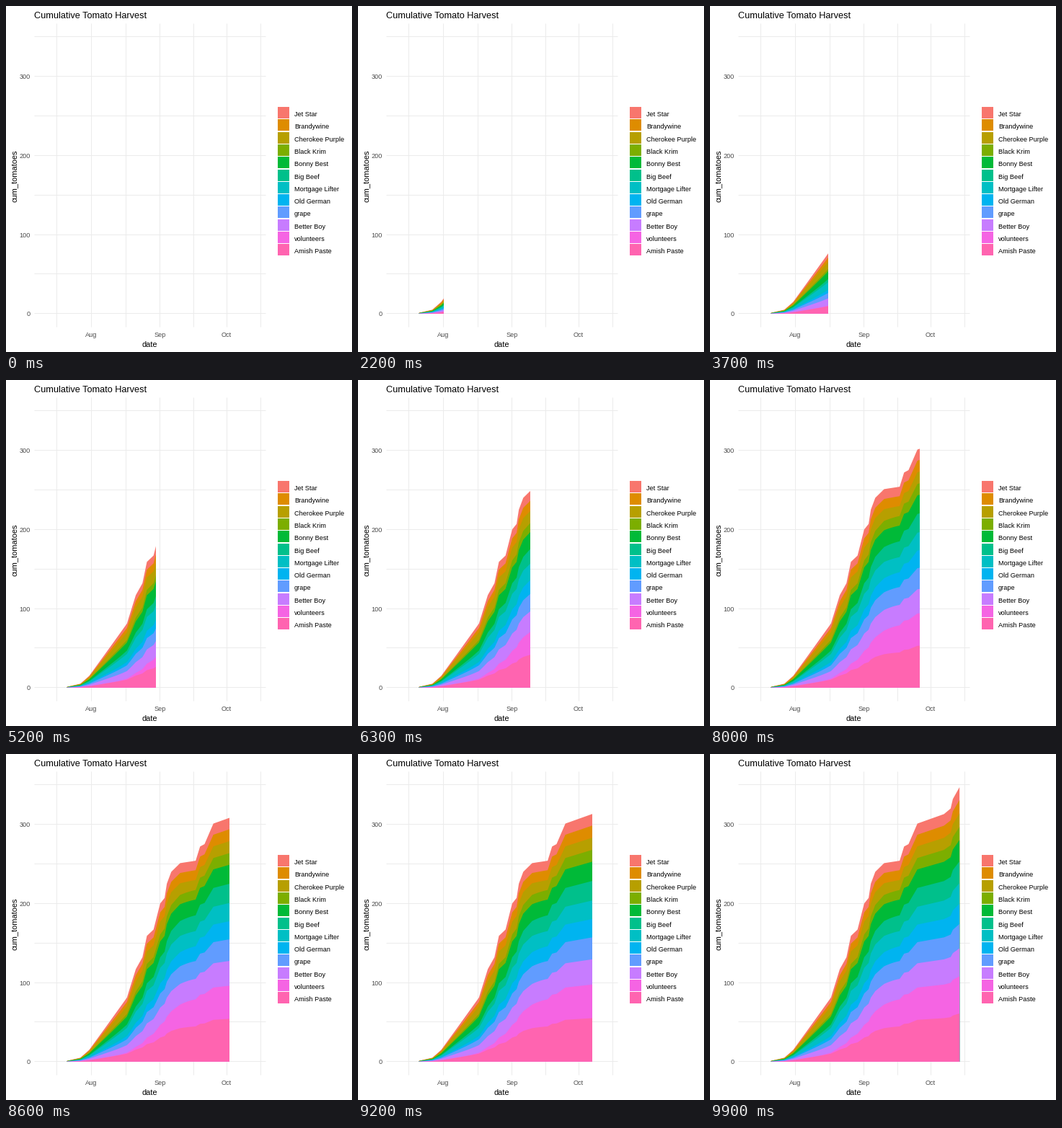
Recreate the animation shown at these times as a matplotlib script. Size 480 by 480 pixels, loop 10000 ms.

```python
import numpy as np
import matplotlib.pyplot as plt
from matplotlib.animation import FuncAnimation
from matplotlib.patches import Rectangle
from matplotlib.transforms import Bbox, TransformedBbox

SIZE, DPI = 480, 100
FRAMES, INTERVAL = 100, 100
FIRST_PICK, LAST_DAY = 10, 95  # days are counted from 11 July
LEFT, RIGHT, TOP, BOTTOM = 39, 360, 24, 445
BASELINE = 426
MONTHS = {"Aug": 21, "Sep": 52, "Oct": 82}

# Name, colour, percentage of the harvest early and late in the season
VARIETIES = [
    ("Jet Star", "#F8766D", 7, 4.7),
    ("Brandywine", "#DE8C00", 7, 4.9),
    ("Cherokee Purple", "#B79F00", 12.5, 4.9),
    ("Black Krim", "#7CAE00", 4, 4.8),
    ("Bonny Best", "#00BA38", 13, 7.8),
    ("Big Beef", "#00C08B", 5, 7.9),
    ("Mortgage Lifter", "#00BFC4", 13, 7.5),
    ("Old German", "#00B4F0", 5, 7.4),
    ("grape", "#619CFF", 9, 8.9),
    ("Better Boy", "#C77CFF", 12, 10.2),
    ("volunteers", "#F564E3", 0.5, 13.6),
    ("Amish Paste", "#FF64B0", 12, 17.6),
]

# Turning points of the cumulative harvest: (day, tomatoes)
HARVEST = [
    (10, 1), (16, 5), (20, 15), (27, 42), (37, 81), (41, 117), (44, 132),
    (46, 159), (49, 167), (52, 200), (54, 207), (55, 225), (57, 240),
    (61, 251), (68, 254), (70, 272), (72, 275), (76, 301), (88, 313),
    (91, 320), (92, 332), (95, 347),
]


def x_of(day):
    return 53.5 + 3.075 * day


def y_of(count):
    return 426.3 - 1.0973 * count


def smoothstep(t):
    t = np.clip(t, 0, 1)
    return t * t * (3 - 2 * t)


fig = plt.figure(figsize=(SIZE / DPI, SIZE / DPI), dpi=DPI, facecolor="white")
ax = fig.add_axes([0, 0, 1, 1])
ax.set_xlim(0, SIZE)
ax.set_ylim(SIZE, 0)
ax.axis("off")


def label(x, y, text, px, color="black", **kwargs):
    ax.text(x, y, text, fontsize=px * 72 / DPI, color=color,
            family="Liberation Sans", **kwargs)


def draw_grid():
    style = dict(color="#EBEBEB", lw=72 / DPI, solid_capstyle="butt",
                 snap=True, zorder=1)
    starts = list(MONTHS.values())
    for day in starts + [5.5, 36.5, 67, 97.5]:
        ax.plot([round(x_of(day))] * 2, [TOP, BOTTOM], **style)
    for count in range(0, 351, 50):
        ax.plot([LEFT, RIGHT], [round(y_of(count))] * 2, **style)


def draw_labels():
    label(39, 17, "Cumulative Tomato Harvest", 12.7)
    label(199, 473, "date", 11, ha="center")
    label(18, 236, "cum_tomatoes", 11, rotation=90, ha="right", va="center")
    for month, day in MONTHS.items():
        label(x_of(day), 459, month, 9.1, "#4D4D4D", ha="center")
    for count in range(0, 301, 100):
        label(34, y_of(count) + 4, str(count), 9.1, "#4D4D4D", ha="right")


def draw_legend():
    for i, (name, color, *_) in enumerate(VARIETIES):
        y = round(140.2 + 17.28 * i)
        ax.add_patch(Rectangle((377, y), 16, 16, fc=color, lw=0))
        label(400, y + 13, name, 9.2)


def draw_areas():
    days = np.arange(FIRST_PICK, LAST_DAY + 1)
    total = np.interp(days, *zip(*HARVEST))
    early, late = np.array([v[2:] for v in VARIETIES]).T[:, :, None]
    shares = early + (late - early) * smoothstep((days - 30) / 40)
    shares /= shares.sum(axis=0)
    # Each area reaches the baseline and the next one covers its lower part
    tops = total * np.cumsum(shares[::-1], axis=0)[::-1]
    return [ax.fill_between(x_of(days), y_of(0), y_of(top), color=color,
                            lw=0, zorder=2)
            for top, (_, color, *_) in zip(tops, VARIETIES)]


draw_grid()
draw_labels()
draw_legend()
areas = draw_areas()

# Every day owns its nearest frame; frames in between are interpolated
all_days = np.arange(LAST_DAY + 1)
day_frames = np.round(all_days * (FRAMES - 1) / LAST_DAY)


def update(frame):
    edge = x_of(np.interp(frame, day_frames, all_days))
    window = TransformedBbox(Bbox([[0, BASELINE], [edge, 0]]), ax.transData)
    for area in areas:
        area.set_clip_box(window)
    return areas


anim = FuncAnimation(fig, update, frames=FRAMES, interval=INTERVAL,
                     init_func=lambda: update(0), repeat=True,
                     repeat_delay=0, blit=False)
plt.show()
```
